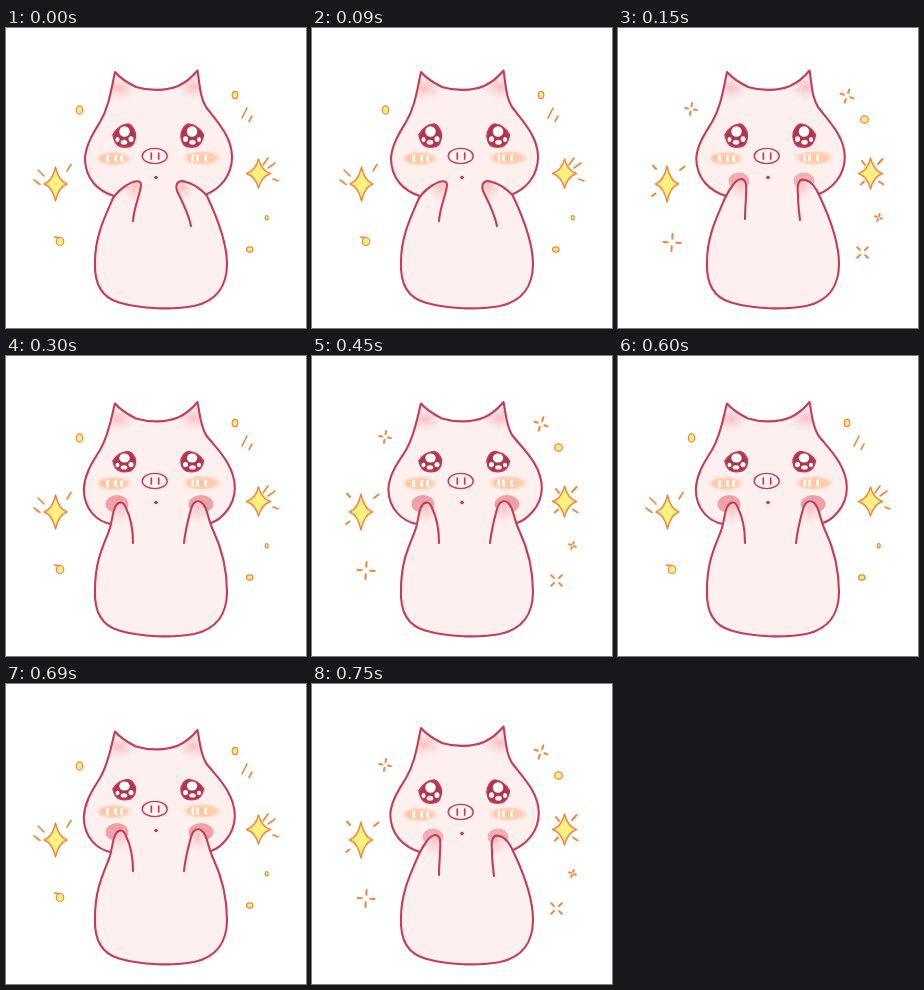
Write an HTML page that moves like this. It is 300 px wide and 300 px high and loops after 0.9 s.

```html
<!DOCTYPE html>
<html lang="en">
<head>
<meta charset="utf-8">
<title>Sparkling piglet</title>
<style>
html, body { margin: 0; width: 100%; height: 100%; overflow: hidden; background: #fff; }
svg { display: block; width: 100vw; height: 100vh; }
</style>
</head>
<body>
<svg viewBox="0 0 300 300" fill="none" stroke-linecap="round" stroke-linejoin="round">
  <defs>
    <radialGradient id="blush">
      <stop offset="0" stop-color="#ffc59c"/>
      <stop offset=".65" stop-color="#ffcba8" stop-opacity=".9"/>
      <stop offset="1" stop-color="#ffdcc8" stop-opacity="0"/>
    </radialGradient>
    <radialGradient id="rosy">
      <stop offset="0" stop-color="#f8b4b8" stop-opacity=".8"/>
      <stop offset="1" stop-color="#fbc9ca" stop-opacity="0"/>
    </radialGradient>
    <clipPath id="headClip"><path id="headShape"/></clipPath>
    <clipPath id="bodyClip"><path id="bodyShape"/></clipPath>
  </defs>
  <g id="scene"></g>
</svg>
<script>
const LINE = '#c63c57', SKIN = '#fff0f0', ORANGE = '#f08540', YELLOW = '#fff080';
const STEP = 150, SQUEEZE = [0, 1, 2, 3, 2, 1];
const $ = id => document.getElementById(id);

const path = (d, stroke = LINE, width = 2.1, fill = 'none') =>
  `<path d="${d}" stroke="${stroke}" stroke-width="${width}" fill="${fill}"/>`;
const oval = (x, y, rx, ry, fill, extra = '') =>
  `<ellipse cx="${x}" cy="${y}" rx="${rx}" ry="${ry}" fill="${fill}" ${extra}/>`;
const mirror = (x, content) => `<g transform="translate(${x} 0) scale(-1 1)">${content}</g>`;

// Arm outlines: the left one runs inner to outer, the right one outer to inner.
const ARMS = [
  { left: 'M127 193C128 178 134 168 135 157C135 151 127 153 121 157C114 161 110 166 107 170',
    right: 'C199 165 189 156 180 154C172 151 169 156 171 163C176 173 182 184 185 198',
    tips: [129, 158, 176, 158], joint: [107, 170, 201, 168] },
  { left: 'M127 191C127 178 129 163 128 156C126 148 119 151 115 157C111 162 109 166 107 170',
    right: 'C199 162 194 153 187 152C180 150 179 158 180 167C180 177 181 184 182 192',
    tips: [123, 156, 184, 156], joint: [107, 170, 202, 169] },
  { left: 'M127 187C127 174 124 160 120 152C117 144 111 145 108 154C106 160 106 167 103 175',
    right: 'C203 166 202 157 199 151C195 143 188 143 185 153C182 164 179 177 178 187',
    tips: [114, 151, 192, 151], joint: [103, 175, 207, 174] }
];

function headPath(squeeze) {
  const l = 79 - [0, .7, 1.2, 2.6][squeeze], r = 226 + [0, .8, 2.8, 3.8][squeeze];
  const pressed = squeeze > 1, drop = pressed ? 3.5 : 0, low = pressed ? 3 : 0;
  const [endL, endR] = pressed ? [105, 205] : [108, 199];
  return `M${endL} 168C92 ${163 + low} ${l} ${151 + low} ${l} ${130 + low}` +
    `C${l + 1} 116 88 104 94 94C103 79 105 62 109 ${44 + drop}` +
    `C115 ${51 + drop} 122 ${55 + drop} 130 ${59 + drop}` +
    `C143 ${63 + drop} 160 ${63 + drop} 172 ${58 + drop}C181 ${54 + drop} 187 ${48 + drop} 191.5 ${42.5 + drop}` +
    `C194 58 194 69 200 79C209 91 ${r} 108 ${r} ${129 + low}` +
    `C${r} ${148 + low} 214 ${161 + low} ${endR} 167`;
}

function bodyPath({ left, right, joint: [lx, ly, rx, ry] }) {
  return `${left}C${lx - 7} ${ly + 17} 89 207 89 234C88 258 97 270 113 274.5` +
    `C135 281 167 282 188 278C211 273 221 257 221 236C221 212 ${rx + 8} ${ry + 17} ${rx} ${ry}${right}`;
}

function eye(pressed) {
  const height = pressed ? 1 : 1.14;
  return `<g transform="translate(0 ${pressed ? 105 : 107}) scale(1 ${height})">` +
    path('M107 0C110 -5 115 -9 122 -9.5C126 -9 130 -3 129.5 1C129 5 127 9 124 10C119 11 115 11 112 9C109 7 108 4 107 0Z',
      LINE, 1.6, '#ad3550') +
    oval(118.5, -3, 5.2, 4.6, '#fff') +
    oval(111.5, 4, 2, 2.2, '#fff') +
    oval(118, 6.4, 3.3, 2.2, '#ffeef0') +
    oval(125, 3.6, 2.5, 2.6, '#fff') + '</g>';
}

function cheek(x, y, rx, gleams) {
  const gleam = dx => path(`M${x + dx} ${y - 2.5}Q${x + dx - 1.5} ${y} ${x + dx} ${y + 2.5}`, '#fffaf4', 2.6);
  return oval(x, y, rx, 8, 'url(#blush)') + oval(x - 10, y, 6, 5, 'url(#blush)') + gleams.map(gleam).join('');
}

function pig(squeeze) {
  const pressed = squeeze > 1, lift = pressed ? -3 : 0;
  const arms = ARMS[Math.min(squeeze, 2)];
  const head = headPath(squeeze), body = bodyPath(arms);
  const headFill = head + 'L185 202L127 202Z';
  $('headShape').setAttribute('d', headFill);
  $('bodyShape').setAttribute('d', body);
  const [tx1, ty1, tx2, ty2] = arms.tips;
  const spots = squeeze === 0 ? '' : pressed
    ? oval(111, 148, 11.5, 9, '#eda2a7') + oval(195, 148, 12.5, 9, '#eda2a7')
    : oval(121, 153, 10.5, 8.5, '#eeb0b4') + oval(186, 153, 10.5, 8.5, '#eeb0b4');
  const nostril = x => path(`M${x} ${125 + lift}V${131 + lift}`, LINE, 1.7);

  return path(headFill, 'none', 0, SKIN) +
    `<g clip-path="url(#headClip)">${oval(113, 60 - lift, 18, 13, 'url(#rosy)')}${oval(188, 59 - lift, 18, 13, 'url(#rosy)')}</g>` +
    path(head) + spots +
    path(body, 'none', 0, SKIN) +
    `<g clip-path="url(#bodyClip)">${oval(tx1, ty1, 13, 18, 'url(#rosy)')}${oval(tx2, ty2, 13, 18, 'url(#rosy)')}</g>` +
    path(body) +
    cheek(108, 130.5 + lift, 19, [-6, 2, 8]) + cheek(196, 130 + lift, 21, [-9, -4, 4]) +
    eye(pressed) + mirror(304.5, eye(pressed)) +
    oval(148.7, 128 + lift, 12.5, 7.6, '#fff4f3', `stroke="${LINE}" stroke-width="1.4"`) +
    nostril(145.3) + nostril(152.7) +
    oval(150, 149.5 + lift, 1.9, 1.7, LINE);
}

const star = (x, y, rx, ry) => path(
  `M${x} ${y - ry}Q${x + 3} ${y - 3} ${x + rx} ${y}Q${x + 3} ${y + 3} ${x} ${y + ry}` +
  `Q${x - 3} ${y + 3} ${x - rx} ${y}Q${x - 3} ${y - 3} ${x} ${y - ry}Z`, ORANGE, 1.4, YELLOW);
const dot = (x, y, rx, ry) => oval(x, y, rx, ry, '#ffee82', `stroke="${ORANGE}" stroke-width="1.2"`);
const dashes = (d, width = 1.6) => path(d, ORANGE, width);
const twinkle = (x, y, r, turn = 0) => `<g transform="translate(${x} ${y}) rotate(${turn})">` +
  dashes(`M0 ${-r}V${-r * .45}M0 ${r}V${r * .45}M${-r} 0H${-r * .5}M${r} 0H${r * .5}`, 2) + '</g>';

const SPARKLES = [
  star(49.5, 156, 11.5, 17) + star(252.5, 145.5, 12, 14.5) +
    dashes('M32 142L38 148M28 152L34 156.5M61 143L65 136.5M257 137L262 130M262 140L269 135M267 151L272 153' +
      'M236 90L241 80M243 93.5L246 88') +
    dot(73.5, 82, 3.2, 4.2) + dot(229, 67, 2.8, 3.6) + dot(54, 213.5, 3.8, 4) +
    dot(243.8, 221.5, 3.2, 2.6) + dot(260.7, 189.7, 1.5, 2.2) + dashes('M48.5 209L53 209.5'),
  star(49, 156, 11.5, 18) + star(252.5, 145.5, 12, 15.5) +
    dashes('M35 137.5L38 141M34 168L37.5 165.5M62 142L66.5 138.5M244 133L247 137M260 136L264.5 131' +
      'M243 156.5L246 153.5M261 153.5L265.5 156.5', 2) +
    twinkle(73, 81, 6, 10) + twinkle(229, 68, 7, 20) + twinkle(54, 214.5, 8.5, 4) +
    twinkle(244.5, 224.5, 7.5, 45) + twinkle(260.5, 189.5, 3.6, 20) + dot(246.5, 91.5, 3.9, 3.7)
];

let shown = -1;
function render() {
  const step = Math.floor(performance.now() / STEP) % SQUEEZE.length;
  if (step !== shown) {
    shown = step;
    $('scene').innerHTML = pig(SQUEEZE[step]) + SPARKLES[step % 2];
  }
  requestAnimationFrame(render);
}
render();
</script>
</body>
</html>
```
